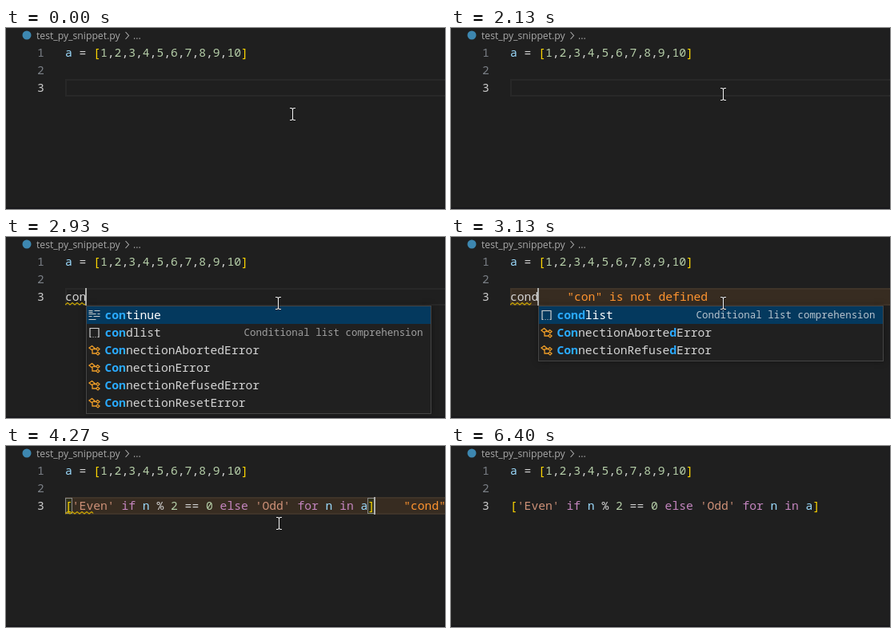
An HTML page with a canvas that plays this animation: 549x227 px, repeating every 6870 ms.

```html
<!DOCTYPE html>
<html lang="en">
<head>
<meta charset="utf-8">
<title>Snippet completion</title>
<style>
html, body { margin: 0; width: 100%; height: 100%; overflow: hidden; background: #1f1f1f; }
canvas { display: block; }
</style>
</head>
<body>
<canvas id="stage" width="549" height="227"></canvas>
<script>
const g = document.getElementById('stage').getContext('2d');
const LOOP = 6870, CH = 8.8, X0 = 74, ROW = 22;
const MONO = '"Noto Sans Mono", "DejaVu Sans Mono", monospace';
const CODE = `500 14.667px ${MONO}`, BOLD = `bold 14.667px ${MONO}`, SMALL = `12.45px ${MONO}`;
const PLAIN = '#d4d4d4', VAR = '#9cdcfe', NUM = '#b5cea8', STR = '#ce9178', KEY = '#c586c0', GOLD = '#ffd700';
const WARN = '#ff942f', BLUE = '#2aaaff', ORANGE = '#ee9d28', PURPLE = '#b180d7';

const LIST = [[VAR, 'a'], [PLAIN, ' = '], [GOLD, '[']];
for (let n = 1; n <= 10; n++) LIST.push([NUM, `${n}`], n < 10 ? [PLAIN, ','] : [GOLD, ']']);
const SNIPPET = [
  [GOLD, '['], [STR, "'Even'"], [KEY, ' if '], [VAR, 'n'], [PLAIN, ' % '], [NUM, '2'], [PLAIN, ' == '], [NUM, '0'],
  [KEY, ' else '], [STR, "'Odd'"], [KEY, ' for '], [VAR, 'n'], [KEY, ' in '], [VAR, 'a'], [GOLD, ']']
];

// Completion items: icon kind, label, matched letter positions
const item = (kind, label, ...hits) => ({ kind, label, hits });
const item3 = (kind, label, ...extra) => item(kind, label, 0, 1, 2, ...extra);
const MENUS = {
  c: [['keyword', 'case'], ['keyword', 'class'], ['keyword', 'continue'], ['cube', 'callable'],
    ['cube', 'chr'], ['class', 'classmethod'], ['cube', 'compile']].map(i => item(...i, 0)),
  co: [['keyword', 'continue'], ['snippet', 'condlist'], ['cube', 'compile'], ['class', 'complex'],
    ['cube', 'copyright'], ['class', 'ConnectionAbortedError'], ['class', 'ConnectionError']].map(i => item(...i, 0, 1)),
  con: [item3('keyword', 'continue'), item3('snippet', 'condlist'), item3('class', 'ConnectionAbortedError'),
    item3('class', 'ConnectionError'), item3('class', 'ConnectionRefusedError'), item3('class', 'ConnectionResetError')],
  cond: [item3('snippet', 'condlist', 3), item3('class', 'ConnectionAbortedError', 16), item3('class', 'ConnectionRefusedError', 16)]
};

// Timelines: [start, value]
const TYPED = [[0, ''], [2400, 'c'], [2530, 'co'], [2670, 'con'], [3070, 'cond'], [4270, 'done']];
const MENU = [[0, ''], [2470, 'c'], [2600, 'co'], [2730, 'con'], [3130, 'cond'], [4270, '']];
const CARET = [[0, 0], [1670, 1], [2130, 0], [2400, 1], [3530, 0], [4000, 1], [4730, 0], [5200, 1], [5670, 0], [6200, 1], [6400, 0]];
const SQUIGGLE = [[0, 0], [2930, 3], [3470, 4], [4530, 0]];
const MESSAGE = [[0, ''], [3000, 'con'], [4000, 'cond'], [4530, '']];
const MOUSE = [
  [0, [358, 108]], [70, [353, 105]], [1000, [350, 106]], [1200, [349, 103]], [1270, [346, 96]], [1330, [343, 88]],
  [1400, [340, 83]], [3600, [340, 87, 'hand']], [3670, [340, 90, 'hand']], [3730, [340, 93, 'hand']],
  [3800, [340, 97, 'hand']], [4270, [341, 97]], [4930, null], [5600, [334, 106]], [5670, [290, 140]],
  [5730, [220, 184]], [5800, [129, 222]], [5870, null]
];
const at = (line, t) => line.findLast(([start]) => start <= t)[1];

function box(color, x, y, w, h) { g.fillStyle = color; g.fillRect(x, y, w, h); }
function frame(color, x, y, w, h) { g.strokeStyle = color; g.lineWidth = 1; g.strokeRect(x + .5, y + .5, w - 1, h - 1); }
function text(s, x, y, color, font = CODE) { g.font = font; g.fillStyle = color; g.fillText(s, x, y); }
function path(d, x, y, color, width = 1, fill) {
  const p = new Path2D(d);
  g.save();
  g.translate(x, y);
  if (fill) { g.fillStyle = fill; g.fill(p); }
  g.strokeStyle = color;
  g.lineWidth = width;
  g.stroke(p);
  g.restore();
}
function tokens(list, y) {
  let x = X0;
  for (const [color, s] of list) { text(s, x, y, color); x += s.length * CH; }
}

// Icons are drawn around their left middle
const ICONS = {
  keyword: (x, y) => path('M0-5.5H5M7-5.5H14M0-1.5H9M11-1.5H14M0 1.5H4M6 1.5H14M0 5.5H9M0-3.5H5', x, y, '#cccccc'),
  cube: (x, y) => path('M7-6.5L12.5-3.5V3L7 6.5L1.5 3V-3.5ZM1.5-3.5L7-.5L12.5-3.5M7-.5V6.5', x, y, PURPLE, 1.1),
  class: (x, y) => path('M4-5.5L7.5-2.5L3.5-.5L.5-3ZM4.5-.5V4H9M6.5-1.5H9M9-1.5L11-3.5L13.5-1.5L11.5.5ZM9 4L11 2L13.5 4L11.5 6Z', x, y, ORANGE, 1.3),
  snippet: (x, y) => path('M1.5 5.5V-5.5H12.5V5.5M1 5.5H3M5 5.5H6M8 5.5H9M11 5.5H13', x, y, '#d0d0d0', 1.2)
};

function header() {
  g.fillStyle = '#3d87b0';
  g.beginPath();
  g.arc(26, 9, 5.5, 0, 7);
  g.fill();
  const font = '12.2px "Open Sans", "Noto Sans", sans-serif';
  text('test_py_snippet.py', 38, 14, '#a9a9a9', font);
  path('M149.5 5L153.5 9.5L149.5 14', 0, 0, '#a9a9a9', 1.1);
  text('...', 159, 14, '#a9a9a9', font);
}

function menu(key, hover) {
  const items = MENUS[key], left = Math.round(X0 + key.length * CH), w = 432, h = items.length * ROW + 4;
  g.save();
  g.shadowColor = 'rgba(0,0,0,.36)';
  g.shadowBlur = 8;
  box('#202020', left, 86, w, h);
  g.restore();
  frame('#454545', left, 86, w, h);
  box('#04395e', left + 1, 87, w - 2, ROW);
  if (items.length > 6) box('rgba(121,121,121,.1)', left + w - 11, 87, 10, h);
  items.forEach(({ kind, label, hits }, i) => {
    const mid = 98 + i * ROW, x = left + 23.5;
    ICONS[kind](left + 3.5, mid);
    [...label].forEach((c, n) => {
      const hit = hits.includes(n);
      text(c, x + n * CH, mid + 5, hit ? BLUE : i ? '#d4d4d4' : '#ffffff', hit ? BOLD : CODE);
    });
    if (kind !== 'snippet') return;
    const full = 'Conditional list comprehension', cut = hover && !i;
    g.textAlign = 'right';
    text(cut ? full.slice(0, -3) + '…' : full, left + w - (cut ? 25.5 : 10.5), mid + 4, i ? '#a0a0a0' : '#b8c4ce', SMALL);
    g.textAlign = 'left';
    if (cut) path('M0-4L4 0L0 4', left + w - 24, mid - 1, '#ffffff', 1.2);
  });
}

function docs() {
  box('#202020', 541, 86, 8, 114);
  frame('#454545', 541, 86, 12, 114);
  ['P', 'c', 'b'].forEach((c, i) => text(c, 546, 103 + i * ROW, '#cccccc', SMALL));
  box('#0098e0', 547, 177, 2, 13);
  box('#5a5a5a', 541, 189, 8, 11);
}

function squiggle(chars) {
  const end = X0 + chars * CH;
  g.save();
  g.beginPath();
  g.rect(X0, 80, end - X0, 8);
  g.clip();
  let d = 'M74 85';
  for (let x = X0; x < end; x += 6) d += `L${x + 3} 82.5L${x + 6} 85`;
  path(d, 0, 0, '#cca700', 1.2);
  g.restore();
}

function pointer([x, y, kind]) {
  if (kind === 'hand') {
    path('M-1.5 1Q0-1 1.5 1V8L9 10V16L7 21H0L-5 14Q-6 11-4 11L-1.5 13Z', x, y, '#111111', 1, '#ffffff');
    path('M4.5 9V12M7 10V13', x, y, '#222222');
    return;
  }
  const d = 'M-3-7.5H-1L.5-6.5L2-7.5H4M.5-6.5V6.5M-3 7.5H-1L.5 6.5L2 7.5H4';
  path(d, x, y, '#111111', 2.2);
  path(d, x, y, '#f0f0f0', 1.1);
}

function draw(now) {
  const t = now % LOOP, typed = at(TYPED, t), open = at(MENU, t), done = typed === 'done';
  const message = at(MESSAGE, t), waves = at(SQUIGGLE, t), mouse = at(MOUSE, t), focused = t < 6400;
  const end = X0 + (done ? 44 : typed.length) * CH;
  box('#1f1f1f', 0, 0, 549, 227);
  box('#18181b', 0, 225, 549, 2);
  box('#19191b', 548, 0, 1, 227);
  header();

  if (focused) {
    g.strokeStyle = '#282828';
    g.lineWidth = 2;
    g.strokeRect(75, 65, 490, 20);
  }
  if (message) {
    box('rgba(255,148,47,.106)', X0, 64, 475, ROW);
    text(`"${message}" is not defined`, end + 36, 80, WARN);
  }
  for (let n = 1; n <= 3; n++) text(n, 39, 14 + n * ROW, n < 3 ? '#7a7f86' : '#cccccc');
  tokens(LIST, 36);
  if (done && focused) {
    for (const x of [74, 452]) {
      box('rgba(0,100,0,.1)', x, 65, 9, 21);
      frame('#888888', x, 65, 9, 20);
    }
  }
  tokens(done ? SNIPPET : [[PLAIN, typed]], 80);
  if (waves) squiggle(waves);
  if (at(CARET, t)) box('#aeafad', Math.floor(end - .5 * (end > X0)), 64, 2, ROW);
  if (open) menu(open, t >= 3600);
  if (t >= 3200 && t < 4270) docs();
  if (mouse) pointer(mouse);
}

const start = performance.now();
function tick() {
  draw(performance.now() - start);
  requestAnimationFrame(tick);
}
tick();
</script>
</body>
</html>
```
